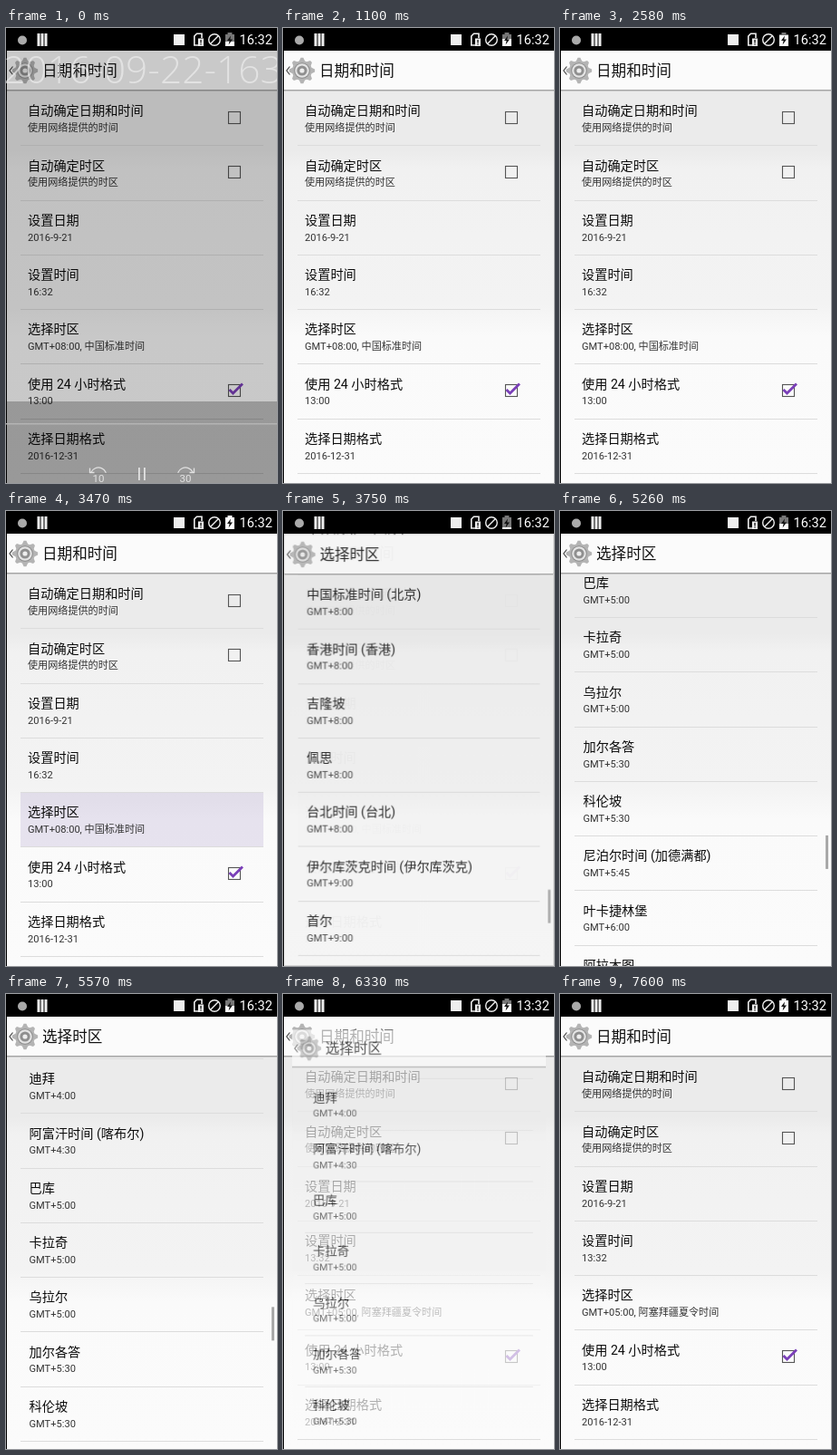
An HTML page with a canvas that plays this animation: 299 px wide and 502 px high, repeating every 8 s.

```html
<!DOCTYPE html>
<html lang="zh-CN">
<head>
<meta charset="utf-8">
<title>日期和时间</title>
<style>
  html, body { margin: 0; width: 100%; height: 100%; overflow: hidden; background: #000; }
  canvas { display: block; }
</style>
</head>
<body>
<canvas id="stage" width="299" height="502"></canvas>
<script>
const W = 299, H = 502, LOOP = 8000;
const BAR = 25, HEAD = 69, ROW = 60.25;
const PIVOT = { x: 149.5, y: 260 };
const FONT = 'Roboto, "Noto Sans CJK SC", "Noto Sans CJK", sans-serif';

const OPEN = 3497, CLOSE = 6280, ZOOM = 300;
const SCROLL = 796.5;
const LINE = '#dcdcdc';

const stage = document.getElementById('stage').getContext('2d');
const layer = document.createElement('canvas');
layer.width = W;
layer.height = H;
const page = layer.getContext('2d');

const zones = [
  ['迪拜', '4:00'], ['阿富汗时间 (喀布尔)', '4:30'], ['巴库', '5:00'],
  ['卡拉奇', '5:00'], ['乌拉尔', '5:00'], ['加尔各答', '5:30'],
  ['科伦坡', '5:30'], ['尼泊尔时间 (加德满都)', '5:45'], ['叶卡捷林堡', '6:00'],
  ['阿拉木图', '6:00'], ['缅甸时间 (仰光)', '6:30'], ['曼谷', '7:00'],
  ['克拉斯诺亚尔斯克', '8:00'], ['中国标准时间 (北京)', '8:00'], ['香港时间 (香港)', '8:00'],
  ['吉隆坡', '8:00'], ['佩思', '8:00'], ['台北时间 (台北)', '8:00'],
  ['伊尔库茨克时间 (伊尔库茨克)', '9:00'], ['首尔', '9:00']
];

// Charging animation: time, top of the filled part
const charge = [
  [0, 15], [480, 13], [1010, 12], [1500, 11], [2030, 10], [2520, 8], [3040, 7],
  [3550, 18], [4290, 16], [4800, 14], [5330, 13], [5690, 12], [6200, 11],
  [6640, 10], [7160, 8], [7600, 7]
];

const clamp = v => Math.max(0, Math.min(1, v));
const span = (t, a, b) => clamp((t - a) / (b - a));
const easeOut = u => 1 - (1 - u) * (1 - u);
const within = (t, a, b) => t >= a && t < b;

function rect(c, x, y, w, h, fill) {
  c.fillStyle = fill;
  c.fillRect(x, y, w, h);
}

function text(c, s, x, y, size, fill) {
  c.font = `${size}px ${FONT}`;
  c.fillStyle = fill;
  c.fillText(s, x, y);
}

function path(c, points, color, width) {
  c.beginPath();
  points.forEach(([x, y]) => c.lineTo(x, y));
  c.strokeStyle = color;
  c.lineWidth = width;
  c.stroke();
}

function disc(c, x, y, r, fill) {
  c.beginPath();
  c.arc(x, y, r, 0, Math.PI * 2);
  c.fillStyle = fill;
  c.fill();
}

function gear(c, x, y) {
  c.beginPath();
  for (let i = 0; i < 32; i++) {
    const r = i % 4 < 2 ? 14.2 : 11;
    const a = (i - 0.5) * Math.PI / 16;
    c.lineTo(x + r * Math.cos(a), y + r * Math.sin(a));
  }
  c.closePath();
  c.fillStyle = '#b4b4b4';
  c.fill();
  disc(c, x, y, 8.8, '#8c8c8c');
  disc(c, x, y, 7.8, '#e4e4e4');
  disc(c, x, y, 5.6, '#8f8f8f');
  disc(c, x, y, 2.6, '#eee');
}

function backdrop(c) {
  const g = c.createLinearGradient(0, 0, 0, H);
  [[0, '#ebebeb'], [135, '#ebebeb'], [155, '#f1f1f1'], [305, '#f3f3f3'], [340, '#fafafa'], [H, '#fbfbfb']]
    .forEach(([y, color]) => g.addColorStop(y / H, color));
  rect(c, 1, BAR, W - 1, H - BAR, g);
}

function header(c, title) {
  rect(c, 1, BAR, W - 1, HEAD - BAR, '#fbfbfb');
  rect(c, 1, HEAD - 1, W - 1, 1.5, '#a6a6a6');
  path(c, [[7.5, 42.5], [4, 47], [7.5, 51.5]], '#444', 1.2);
  gear(c, 21, 47);
  text(c, title, 40, 53.2, 16.6, '#111');
}

function row(c, x, y, title, sub) {
  text(c, title, x, y, 14.2, '#0c0c0c');
  text(c, sub, x, y + 17.8, 11.1, '#333');
  rect(c, 16, Math.round(y + 33), 268, 1, LINE);
}

function press(c, y) {
  rect(c, 16, Math.round(y - 26.5), 268, 60, 'rgba(110,80,160,.14)');
}

function checkbox(c, y, on) {
  c.strokeStyle = '#555';
  c.lineWidth = 1.1;
  c.strokeRect(245.5, y + 0.5, 13, 13);
  if (on) path(c, [[246.5, y + 6], [250.5, y + 10], [261, y - 0.5]], '#7a3fb8', 2.8);
}

function drawSettings(c, t) {
  const moved = t >= CLOSE;
  const rows = [
    ['自动确定日期和时间', '使用网络提供的时间'],
    ['自动确定时区', '使用网络提供的时区'],
    ['设置日期', '2016-9-21'],
    ['设置时间', moved ? '13:32' : '16:32'],
    ['选择时区', moved ? 'GMT+05:00, 阿塞拜疆夏令时间' : 'GMT+08:00, 中国标准时间'],
    ['使用 24 小时格式', '13:00'],
    ['选择日期格式', '2016-12-31']
  ];
  const rowY = i => 96.4 + ROW * i;
  backdrop(c);
  if (within(t, 2310, 2520)) press(c, rowY(3));
  if (within(t, 3280, OPEN + ZOOM)) press(c, rowY(4));
  rows.forEach(([title, sub], i) => row(c, 24, rowY(i), title, sub));
  checkbox(c, 92, false);
  checkbox(c, 152, false);
  checkbox(c, 393, true);
  header(c, '日期和时间');
}

// A short drag runs into a decelerating fling
function scrollAt(t) {
  const fling = x => SCROLL * easeOut(span(x, 4686, 5690));
  return t < 4740 ? fling(4740) * span(t, 4620, 4740) ** 2 : fling(t);
}

function thumbAlpha(t) {
  return t < 4620 ? 1 - span(t, 3790, 3860) : 1 - span(t, 5940, 6050);
}

function drawZones(c, t) {
  const s = scrollAt(t);
  const rowY = i => 96.4 + (i - 13) * ROW + s;
  backdrop(c);
  if (within(t, 6190, CLOSE)) press(c, rowY(2));
  rect(c, 16, Math.round(rowY(-1) + 33), 268, 1, LINE);
  zones.forEach(([name, offset], i) => {
    const y = rowY(i);
    if (y > 20 && y < H + 20) row(c, 25.5, y, name, 'GMT+' + offset);
  });
  c.globalAlpha = thumbAlpha(t);
  rect(c, 293, 418.6 - 0.0933 * s, 3, 37, '#a9a9a9');
  c.globalAlpha = 1;
  header(c, '选择时区');
}

function showPage(draw, t, scale, alpha) {
  page.clearRect(0, 0, W, H);
  draw(page, t);
  stage.save();
  stage.globalAlpha = alpha;
  stage.translate(PIVOT.x, PIVOT.y);
  stage.scale(scale, scale);
  stage.drawImage(layer, -PIVOT.x, -PIVOT.y);
  stage.restore();
}

function drawPages(t) {
  const opening = span(t, OPEN, OPEN + ZOOM);
  const closing = span(t, CLOSE, CLOSE + ZOOM);
  rect(stage, 1, BAR, W - 1, H - BAR, '#d0d0d0');
  if (opening < 1) showPage(drawSettings, t, 1, 1 - opening);
  else if (closing > 0) showPage(drawSettings, t, 1, 1);

  if (opening > 0 && closing < 1) {
    const enter = easeOut(opening), leave = easeOut(closing);
    showPage(drawZones, t, 0.8 + 0.2 * (enter - leave), opening * (1 - leave));
  }
}

function battery(c, t) {
  const top = charge.filter(([at]) => at <= t).pop()[1];
  rect(c, 244.5, 5, 5, 2, top <= 7 ? '#fff' : '#777');
  rect(c, 242, 7, 10, 13, '#777');
  rect(c, 242, top, 10, 20 - top, '#fff');
  c.beginPath();
  [[248, 8.5], [244, 14], [246.6, 14], [245.6, 18.5], [250, 12.5], [247.3, 12.5]]
    .forEach(([x, y]) => c.lineTo(x, y));
  c.fillStyle = '#111';
  c.fill();
}

function drawStatus(c, t) {
  rect(c, 0, 0, W, BAR, '#000');
  disc(c, 18, 13.5, 5, '#aaa');
  [34.5, 38.5, 42.5].forEach(x => rect(c, x, 6, 3, 14, '#eee'));
  rect(c, 185, 7, 12, 12, '#eee');

  path(c, [[212, 19], [207.8, 19], [207.8, 9], [210.5, 6.2], [216, 6.2], [216, 11]], '#eee', 1.6);
  rect(c, 212, 11.5, 6, 8.5, '#eee');
  rect(c, 214.4, 13, 1.2, 3.5, '#000');
  rect(c, 214.4, 17.4, 1.2, 1.2, '#000');

  c.beginPath();
  c.arc(230, 13, 6.3, 0, Math.PI * 2);
  c.strokeStyle = '#eee';
  c.lineWidth = 1.4;
  c.stroke();
  path(c, [[225.8, 17.3], [234.2, 8.7]], '#eee', 1.4);

  battery(c, t);
  text(c, t >= CLOSE ? '13:32' : '16:32', 257.6, 18.4, 14.6, '#fff');
}

function skip(c, x, label, dir) {
  c.beginPath();
  c.arc(x, 494, 9, Math.PI * 1.12, Math.PI * 1.88);
  c.strokeStyle = '#e2e2e2';
  c.lineWidth = 1.3;
  c.stroke();
  const tip = x + dir * 9.5;
  path(c, [[tip, 485.5], [tip, 490.5], [tip - dir * 5, 490.5]], '#e2e2e2', 1.3);
  c.textAlign = 'center';
  text(c, label, x, 501, 11.5, '#e2e2e2');
  c.textAlign = 'left';
}

function drawPlayer(c, t) {
  const alpha = 1 - span(t, 15, 265);
  if (!alpha) return;
  c.save();
  c.globalAlpha = alpha;
  rect(c, 0, BAR, W, H - BAR, 'rgba(0,0,0,.2)');
  rect(c, 0, 412, W, H - 412, 'rgba(0,0,0,.24)');
  rect(c, 0, 436, W, 1.5, '#b4b4b4');
  c.font = '300 42.5px "Open Sans", "Noto Sans", sans-serif';
  c.fillStyle = 'rgba(240,240,240,.65)';
  c.fillText('2016-09-22-163', -3, 60.5);
  skip(c, 102, '10', -1);
  skip(c, 198, '30', 1);
  rect(c, 146, 485, 1.8, 14, '#e2e2e2');
  rect(c, 152, 485, 1.8, 14, '#e2e2e2');
  c.restore();
}

let start;
function tick(now) {
  start ??= now;
  const t = (now - start) % LOOP;
  rect(stage, 0, 0, W, H, '#000');
  drawPages(t);
  drawStatus(stage, t);
  drawPlayer(stage, t);
  requestAnimationFrame(tick);
}
requestAnimationFrame(tick);
</script>
</body>
</html>
```
